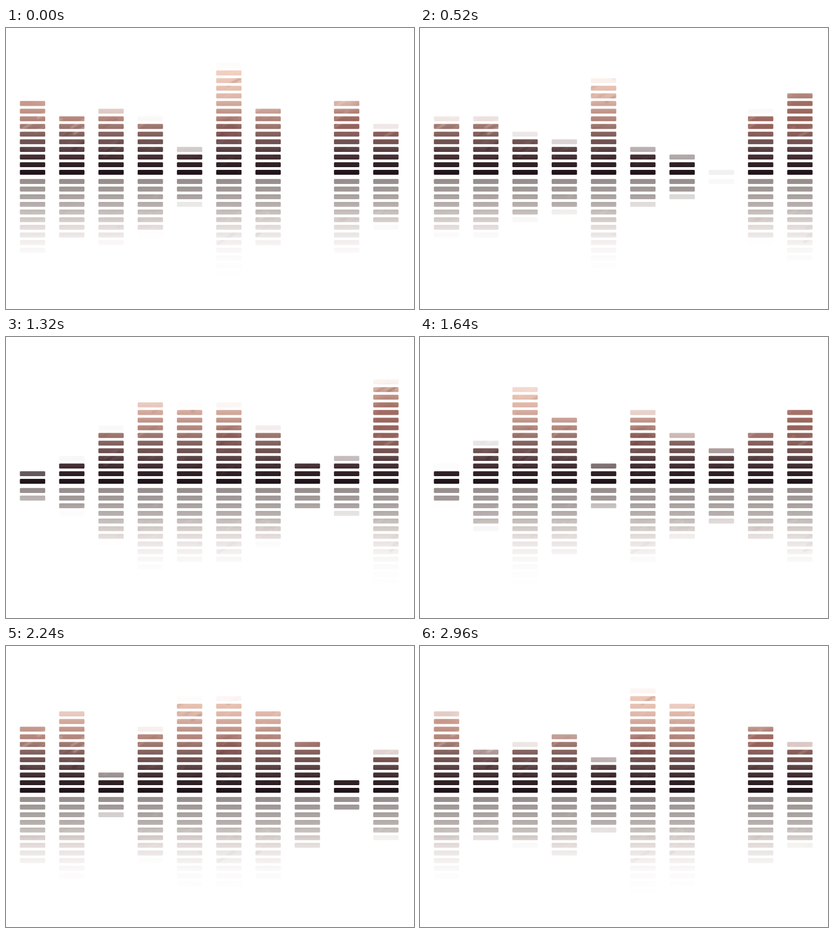
Animation of 750 by 517 pixels, one loop 3000 ms. Source, as an HTML page:

```html
<!DOCTYPE html>
<html lang="en">
<head>
<meta charset="utf-8">
<title>Equalizer</title>
<style>
  html, body { margin: 0; width: 100%; height: 100%; overflow: hidden; background: #fff; }
  svg { display: block; width: 750px; height: 517px; }
</style>
</head>
<body>
<svg id="stage" viewBox="0 0 750 517"></svg>
<script>
const NS = 'http://www.w3.org/2000/svg';
const LOOP = 3000, STEP = 40;
const COLS = 10, ROWS = 17, PITCH_X = 72.17, PITCH_Y = 14.07;
const LEFT = 25.5, TOP_ROW = 261, MIRROR_ROW = 277.8, BAR_W = 46.6, BAR_H = 9.1;

// Column heights in rows; the fraction is the opacity of the uppermost bar.
const TIMES = [0, 520, 880, 1320, 1920, 2240, 2960, 3000];
const LEVELS = [
  [10, 8, 8.5, 7.06, 3.28, 14.08, 8.9, 0, 9.9, 6.15],
  [7.2, 7.25, 5.15, 4.25, 12.25, 3.42, 2.42, 0.06, 8.05, 10.9],
  [12.6, 8.9, 6.15, 6.45, 2.38, 6.95, 6.2, 7.7, 7.95, 10.9],
  [1.75, 3.04, 7.05, 10.75, 10.03, 10.12, 7.15, 2.98, 3.35, 13.22],
  [3.12, 11, 12.15, 7, 0.97, 6.85, 8.95, 6.33, 7.2, 9],
  [8.95, 10.75, 2.52, 8.15, 12.05, 12.15, 11, 6.95, 2, 5.28],
  [10.5, 5.65, 6.18, 7.8, 4.45, 13.2, 11.8, 0, 8.95, 6.35]
];
LEVELS.push(LEVELS[0]);
const SEGMENTS = TIMES.length - 1;

const UPPER = ['#20141a', '#302124', '#432f33', '#5a4243', '#6f5252', '#84625f', '#9d776f', '#b4877c', '#c2968b',
  '#d2aa9d', '#e0b8aa', '#e6bfaf', '#ebc6b7', '#f2cfbf', '#f4d6c8', '#f5dad0', '#f6ded5'];
const LOWER = ['#978f8d', '#a09997', '#aaa3a0', '#b6aead', '#c5beba', '#d4ccc9', '#e3dcda', '#ece7e6', '#f4f0ef',
  '#f9f7f7', '#fcfbfb', '#fdfdfd', '#fefefe', '#fff'];

const stage = document.getElementById('stage');

function add(parent, tag, attrs) {
  const node = document.createElementNS(NS, tag);
  for (const key in attrs) node.setAttribute(key, attrs[key]);
  parent.appendChild(node);
  return node;
}

function seeded(seed) {
  return () => (seed = (seed * 16807) % 2147483647) / 2147483647;
}

const defs = add(stage, 'defs', {});

function rowGradient(id, colors, start, step) {
  const gradient = add(defs, 'linearGradient', {
    id, gradientUnits: 'userSpaceOnUse', x1: 0, x2: 0, y1: start, y2: start + step * (colors.length - 1)
  });
  colors.forEach((color, i) => add(gradient, 'stop', { offset: i / (colors.length - 1), 'stop-color': color }));
}
rowGradient('upper', UPPER, TOP_ROW + BAR_H / 2, -PITCH_Y);
rowGradient('lower', LOWER, MIRROR_ROW + BAR_H / 2, PITCH_Y);

const blur = add(defs, 'filter', {
  id: 'soft', filterUnits: 'userSpaceOnUse', x: 0, y: 0, width: 750, height: 517
});
add(blur, 'feGaussianBlur', { stdDeviation: 1.6 });

function glow(parent, id, color, opacity, cx, cy, rx, ry) {
  const gradient = add(defs, 'radialGradient', { id });
  add(gradient, 'stop', { offset: 0.3, 'stop-color': color, 'stop-opacity': opacity });
  add(gradient, 'stop', { offset: 1, 'stop-color': color, 'stop-opacity': 0 });
  add(parent, 'ellipse', { cx, cy, rx, ry, fill: `url(#${id})` });
}

const mask = add(defs, 'mask', { id: 'bars', maskUnits: 'userSpaceOnUse', x: 0, y: 0, width: 750, height: 517 });
const photo = add(stage, 'g', { mask: 'url(#bars)' });
add(photo, 'rect', { width: 750, height: 274, fill: 'url(#upper)' });
add(photo, 'rect', { y: 274, width: 750, height: 243, fill: 'url(#lower)' });
glow(photo, 'right', '#8f5850', 0.75, 705, 150, 75, 75);
glow(photo, 'rightLow', '#8f554d', 0.6, 620, 176, 90, 30);
glow(photo, 'leftTop', '#bb8577', 0.6, 40, 115, 55, 55);
glow(photo, 'center', '#7b4644', 0.55, 408, 187, 40, 26);

const streaks = add(photo, 'g', { filter: 'url(#soft)' });
function scatter(seed, count, y0, y1, light, dark, opacity) {
  const random = seeded(seed);
  for (let i = 0; i < count; i++) {
    const x = random() * 740, y = y0 + random() * (y1 - y0), length = 14 + random() * 22;
    add(streaks, 'path', {
      d: `M${x} ${y}l${length} ${-length * 0.62}`, 'stroke-width': 2 + random() * 3,
      stroke: i % 2 ? light : dark, 'stroke-opacity': opacity * (0.5 + random())
    });
  }
}
scatter(71, 90, 70, 205, '#f6dcd2', '#8a5a52', 0.25);
scatter(29, 40, 195, 255, '#8d7074', '#24161d', 0.18);
scatter(53, 50, 310, 400, '#f4efed', '#a79e9a', 0.14);

const bars = [];
for (let col = 0; col < COLS; col++) {
  for (let row = 0; row < ROWS; row++) {
    const shape = { x: LEFT + col * PITCH_X, width: BAR_W, height: BAR_H, rx: 1.6, fill: '#fff' };
    bars.push({ col, row, nodes: [
      add(mask, 'rect', { ...shape, y: TOP_ROW - row * PITCH_Y }),
      add(mask, 'rect', { ...shape, y: MIRROR_ROW + row * PITCH_Y })
    ] });
  }
}

const clamp = (v, lo, hi) => Math.min(hi, Math.max(lo, v));
const span = i => TIMES[i + 1] - TIMES[i];

function slope(i, col) {
  const next = i % SEGMENTS, prev = (next + SEGMENTS - 1) % SEGMENTS;
  const rate = k => (LEVELS[k + 1][col] - LEVELS[k][col]) / span(k);
  const h0 = span(prev), h1 = span(next);
  return clamp((rate(prev) * h1 + rate(next) * h0) / (h0 + h1), -0.04, 0.04);
}

// Smooth curve through the key heights, with a small bounce between them.
function level(col, time) {
  let i = 0;
  while (time >= TIMES[i + 1]) i++;
  const h = span(i), u = (time - TIMES[i]) / h, v = 1 - u;
  const curve = v * v * (1 + 2 * u) * LEVELS[i][col] + u * u * (3 - 2 * u) * LEVELS[i + 1][col]
    + h * u * v * (v * slope(i, col) - u * slope(i + 1, col));
  const bounce = 1.8 * Math.min(1, h / 400) * Math.sin(Math.PI * u)
    * Math.sin(time / 60 + col * 2.4);
  return clamp(curve + bounce, 0, 16.5);
}

function render(time) {
  const heights = Array.from({ length: COLS }, (_, col) => level(col, time));
  for (const { col, row, nodes } of bars) {
    const opacity = clamp(heights[col] - row, 0, 1).toFixed(3);
    for (const node of nodes) node.setAttribute('fill-opacity', opacity);
  }
}

const start = performance.now();
function tick() {
  const elapsed = (performance.now() - start) % LOOP;
  render(Math.floor(elapsed / STEP) * STEP);
  requestAnimationFrame(tick);
}
tick();
</script>
</body>
</html>
```
